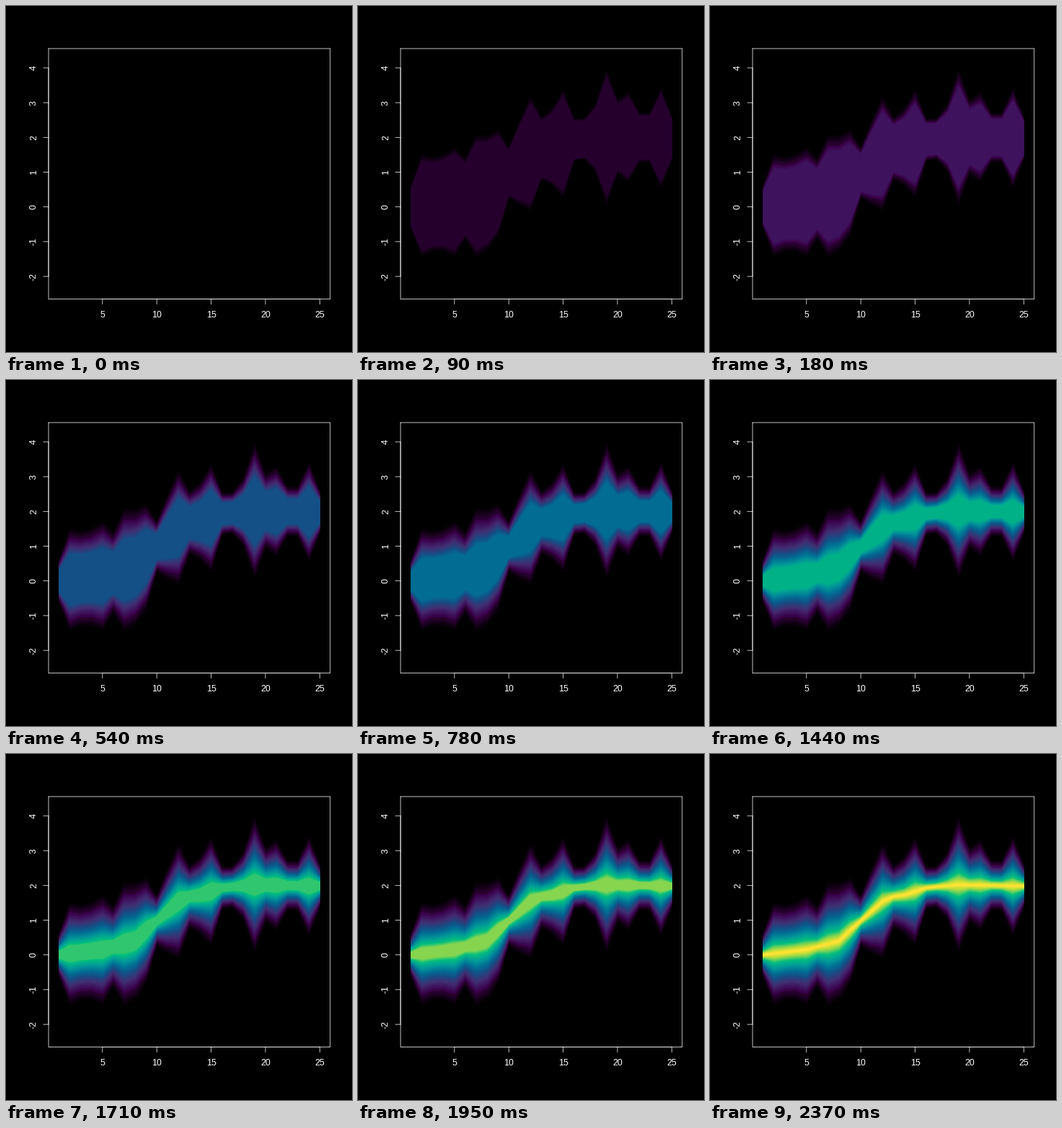
Recreate the animation shown at these times as a matplotlib script. Size 480 by 480 pixels, loop 2400 ms.

```python
import numpy as np
import matplotlib.pyplot as plt
from matplotlib.animation import FuncAnimation
from matplotlib.collections import PolyCollection
from matplotlib.colors import to_rgb

SIZE, DPI = 480, 72
FRAMES, INTERVAL = 80, 30
LAST = FRAMES - 1
LEFT, RIGHT, TOP, BOTTOM = 59.04, 449.76, 59.04, 406.56
TICK = 7.2
LINE_WIDTH = .75
FADE_START, FADE_STEPS = 1.2, 6  # thin bands while the outer tail appears


def px(x):
    return 58.44 + 15.074 * x


def py(y):
    return 278.7 - 48.2 * y


# The centre line rises from 0 to 2; the spread is random around it
X = np.arange(1, 26)
CENTRE_KEYS = [(1, 0), (5, .15), (8, .4), (9, .7), (10, .98), (12, 1.54),
               (13, 1.68), (14, 1.72), (16, 1.93), (19, 2.02), (25, 1.98)]
CENTRE = np.interp(X, *zip(*CENTRE_KEYS))
SPREAD = np.array([.5, 1.25, 1.16, 1.19, 1.34, .98, 1.5, 1.42, 1.3, .6, 1.03,
                   1.4, .76, .94, 1.32, .51, .5, .82, 1.66, .9, 1.1, .6, .6,
                   1.22, .51])

# Dark purple start, then evenly spaced colours up to yellow
RAMP = [(1, "#000000"), (3, "#26002d"), (4, "#3a004a"), (6, "#3e125c")]
RAMP += [(1 + (LAST - 1) * i / 9, c) for i, c in enumerate(
    ["#422c70", "#125086", "#007094", "#008e98", "#00a890", "#00be7d",
     "#66d05e", "#bbdd38", "#fde333"], start=1)]
RAMP_TIMES = [t for t, _ in RAMP]
RAMP_RGB = np.array([to_rgb(c) for _, c in RAMP])


def color_at(t):
    return [np.interp(t, RAMP_TIMES, RAMP_RGB[:, i]) for i in range(3)]


def quantile(t):
    """Approximate normal quantile, falling to zero at the last frame."""
    tail = t / (2 * LAST)
    return 4.91 * ((1 - tail) ** .14 - tail ** .14)


def band(t):
    half = SPREAD * quantile(t) / quantile(3) + .012
    x = px(X)
    top, low = py(CENTRE + half), py(CENTRE - half)
    return np.column_stack([np.append(x, x[::-1]), np.append(top, low[::-1])])


times = np.append(np.linspace(FADE_START, 3, 2 * FADE_STEPS),
                  np.arange(4, FRAMES))
bands = [band(t) for t in times]
colors = [color_at(t) for t in times]

fig = plt.figure(figsize=(SIZE / DPI, SIZE / DPI), dpi=DPI, facecolor="black")
ax = fig.add_axes([0, 0, 1, 1])
ax.set_xlim(0, SIZE)
ax.set_ylim(SIZE, 0)
ax.axis("off")

fan = PolyCollection([], linewidths=0, edgecolors="none", antialiaseds=False)
ax.add_collection(fan, autolim=False)


def line(xs, ys):
    ax.plot(xs, ys, color="white", lw=LINE_WIDTH, snap=False,
            solid_capstyle="round")


def label(x, y, value, angle=0):
    ax.text(x, y, str(value), color="white", fontsize=12.4, rotation=angle,
            family="Liberation Sans", ha="center", va="baseline",
            rotation_mode="anchor")


line([LEFT, RIGHT, RIGHT, LEFT, LEFT], [TOP, TOP, BOTTOM, BOTTOM, TOP])
line([px(5), px(25)], [BOTTOM, BOTTOM])
line([LEFT, LEFT], [py(-2), py(4)])
for v in range(5, 26, 5):
    line([px(v), px(v)], [BOTTOM, BOTTOM + TICK])
    label(px(v), 432, v)
for v in range(-2, 5):
    line([LEFT - TICK, LEFT], [py(v), py(v)])
    label(42, py(v), v, 90)


def update(frame):
    n = int(np.searchsorted(times, frame + 1e-6)) if frame > 1 else 0
    fan.set_verts(bands[:n])
    fan.set_facecolor(colors[:n])
    return [fan]


anim = FuncAnimation(fig, update, frames=FRAMES, interval=INTERVAL,
                     repeat=True, repeat_delay=0, blit=False)
plt.show()
```
